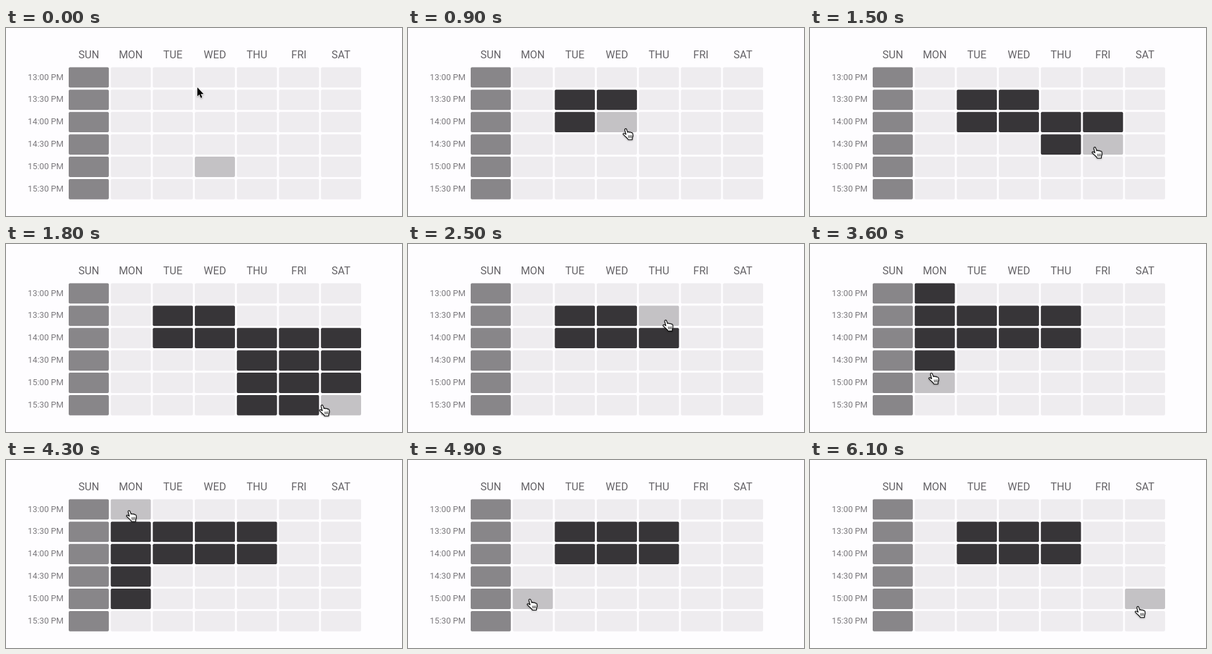
Write an HTML page that moves like this. It is 600 by 285 pixels and loops after 7400 ms.

```html
<!DOCTYPE html>
<html lang="en">
<head>
<meta charset="utf-8">
<title>Timetable</title>
<style>
  html, body { margin: 0; width: 100%; height: 100%; overflow: hidden; background: #fefdff; }
  svg { display: block; width: 100%; height: 100%; }
  text { font-family: Roboto, "Noto Sans", sans-serif; }
  .day { font-size: 16px; fill: #656367; text-anchor: middle; }
  .time { font-size: 12.8px; fill: #7b797d; text-anchor: end; }
  .cursor { stroke-linejoin: round; stroke-linecap: round; filter: drop-shadow(0 1px 1px #0005); }
</style>
</head>
<body>
<svg viewBox="0 0 600 285">
  <g id="table"></g>
  <g id="arrow" class="cursor">
    <path d="M0 0V13.6L3.1 10.7 5.3 15.9 7.4 15 5.2 9.9H9.4Z" stroke="#fff" stroke-width="1.1" paint-order="stroke"/>
  </g>
  <g id="hand" class="cursor" stroke="#000">
    <path d="M-1 2C-1.4 .2 1 -.4 1.7 1.2L3.4 5.7C4 4.6 5.6 4.8 6 5.9 6.8 5 8.2 5.3 8.6 6.5 9.6 5.9 10.9 6.5 11.2 7.8 11.8 10.6 11.4 12.4 10.5 14L10.4 16.8H4.2C3.6 14.9 1.4 13.6 -.2 12L-3.2 9C-4.2 7.8 -2.8 6.7 -1.4 7.5L.8 8.8Z" fill="#fff" stroke-width="1.1"/>
    <path d="M4.7 10.6L5 14M6.8 10.5L7 14M8.9 10.3V13.8" fill="none" stroke-width=".8"/>
  </g>
</svg>
<script>
const LOOP = 7400, TICK = 100;
const DAYS = ["SUN", "MON", "TUE", "WED", "THU", "FRI", "SAT"];
const TIMES = ["13:00", "13:30", "14:00", "14:30", "15:00", "15:30"];
const COLOR = { off: "#888689", empty: "#eeecef", on: "#373538", hover: "#c4c2c5" };
const WIDTH = 60.8, HEIGHT = 30.8;
const colX = c => 95 + 63.7 * c;
const rowY = r => 59.5 + 33.9 * r;

// Pointer positions are in columns and rows; a move with "paint" drags a selection
const START = { c: 3.06, r: 0.9 };
const FIRST_HOVER = { c: 3, r: 4 };
const MOVES = [
  { from: 200, to: 200, c: 2.67, r: 1.43 },
  { from: 400, to: 700, c: 3.68, r: 2.74, paint: "on" },
  { from: 1000, to: 1100, c: 4.87, r: 2.55 },
  { from: 1400, to: 1800, c: 6.02, r: 5.44, paint: "on" },
  { from: 2100, to: 2500, c: 4.63, r: 1.64, paint: "on" },
  { from: 2700, to: 3000, c: -0.35, r: 2.43 },
  { from: 3100, to: 3300, c: 1.43, r: 0.55 },
  { from: 3400, to: 3600, c: 1.39, r: 4.01, paint: "on" },
  { from: 4000, to: 4300, c: 1.43, r: 0.5 },
  { from: 4400, to: 4900, c: 1.4, r: 4.46, paint: "empty" },
  { from: 5100, to: 5300, c: 7.66, r: 5.09 },
  { from: 6000, to: 6100, c: 6.3, r: 4.79 }
];

const byId = id => document.getElementById(id);
const table = byId("table"), arrow = byId("arrow"), hand = byId("hand");

function add(tag, attrs, text = "") {
  const el = document.createElementNS(table.namespaceURI, tag);
  for (const key in attrs) el.setAttribute(key, attrs[key]);
  el.textContent = text;
  return table.appendChild(el);
}

DAYS.forEach((day, c) =>
  add("text", { class: "day", x: colX(c) + WIDTH / 2, y: 46.2 }, day));
TIMES.forEach((time, r) =>
  add("text", { class: "time", x: 87.3, y: rowY(r) + 19 }, time + " PM"));
const cells = TIMES.map((_, r) => DAYS.map((_, c) =>
  add("rect", { x: colX(c), y: rowY(r), width: WIDTH, height: HEIGHT, rx: 2 })));

const smooth = p => p * p * (3 - 2 * p);
const between = (v, a, b) => v >= Math.min(a, b) && v <= Math.max(a, b);
const cellAt = ({ c, r }) => ({ c: Math.floor(c + 0.025), r: Math.floor(r + 0.045) });

// Consecutive painting moves belong to one drag and share its first cell
function stateAt(t) {
  let pos = START, drag = null;
  const drags = [];
  for (const { from, to, c, r, paint } of MOVES) {
    if (t < from) break;
    if (!paint) drag = null;
    else if (!drag) drags.push(drag = { paint, start: cellAt(pos) });
    const p = smooth(Math.min(1, (t - from + TICK) / (to - from + TICK)));
    pos = { c: pos.c + (c - pos.c) * p, r: pos.r + (r - pos.r) * p };
    if (drag) drag.end = cellAt(pos);
  }
  return { pos, drags };
}

function render(t) {
  const { pos, drags } = stateAt(t);
  const hover = pos === START ? FIRST_HOVER : cellAt(pos);

  cells.forEach((row, r) => row.forEach((cell, c) => {
    let look = c ? "empty" : "off";
    for (const { paint, start, end } of drags)
      if (between(c, start.c, end.c) && between(r, start.r, end.r)) look = paint;
    if (c && c === hover.c && r === hover.r) look = "hover";
    cell.setAttribute("fill", COLOR[look]);
  }));

  const pointing = pos !== START && between(hover.c, 1, 6);
  for (const el of [arrow, hand]) {
    el.setAttribute("transform", `translate(${colX(pos.c)} ${rowY(pos.r)})`);
    el.style.display = (el === hand) === pointing ? "" : "none";
  }
}

const begin = performance.now();
function frame() {
  const t = (performance.now() - begin) % LOOP;
  render(Math.floor(t / TICK) * TICK);
  requestAnimationFrame(frame);
}
frame();
</script>
</body>
</html>
```
